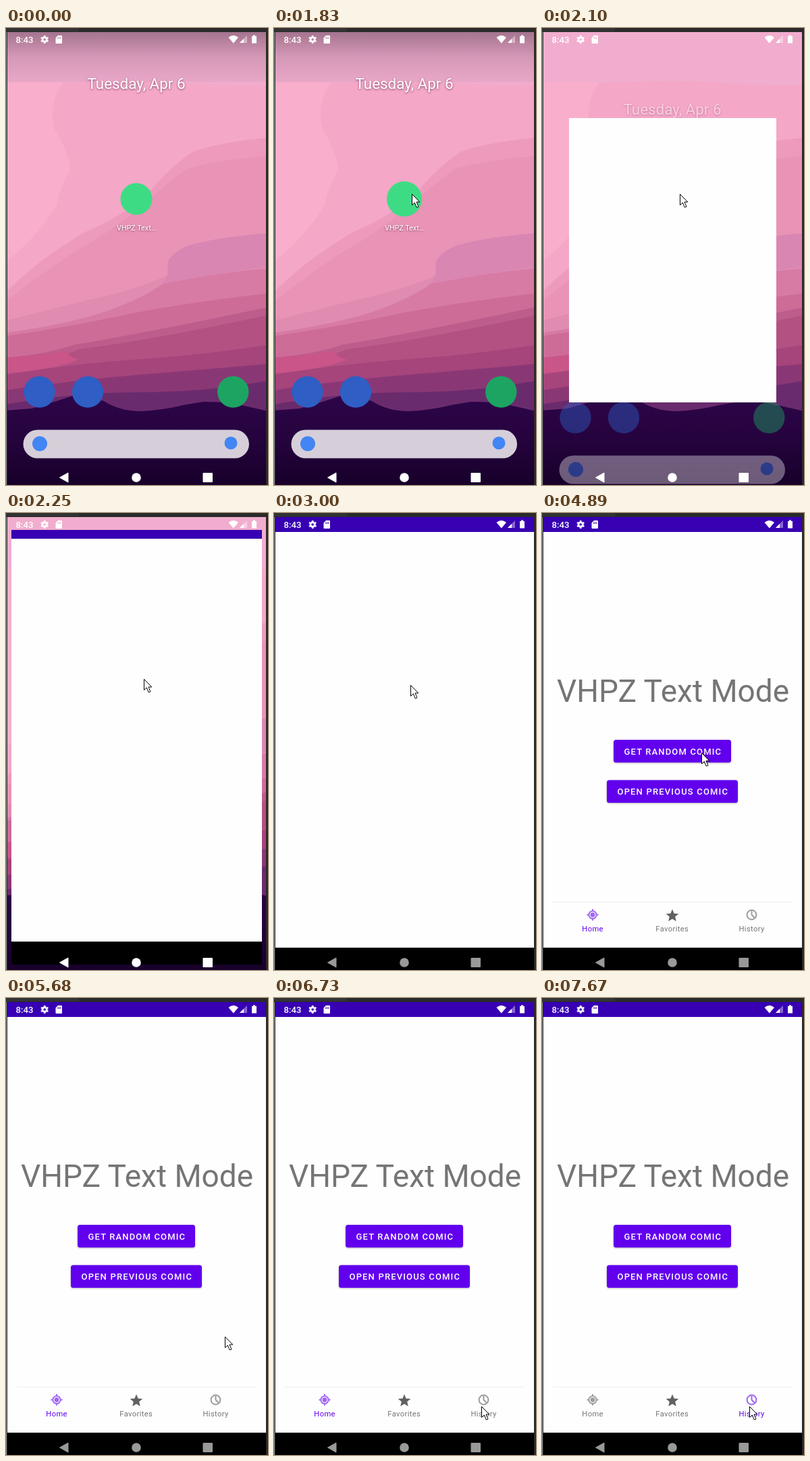
Write an HTML page that moves like this. It is 388x675 px and loops after 8000 ms.

```html
<!DOCTYPE html>
<html lang="en">
<head>
<meta charset="utf-8">
<title>App launch</title>
<style>
  html, body { margin: 0; height: 100%; overflow: hidden; background: #2b2a2b; }
  svg { display: block; width: 100vw; height: 100vh; font-family: Roboto, sans-serif; }
  .glow { filter: drop-shadow(0 1px 1.5px rgba(60, 10, 50, .6)); }
  .button { font-weight: 500; font-size: 13px; letter-spacing: 1.16px; fill: #fff; }
  .tab { color: #757575; font-size: 11.2px; letter-spacing: .37px; }
  .tab text { fill: currentColor; }
  .tab .icon { color: #9e9e9e; }
  .tab.on { color: #6200ee; }
  .tab.on .icon { color: #a066f3; }
</style>
</head>
<body>
<svg viewBox="0 0 388 675" preserveAspectRatio="none">
  <defs>
    <linearGradient id="scrimFill" x2="0" y2="1">
      <stop offset="0" stop-color="#2a1828" stop-opacity=".38"/>
      <stop offset=".5" stop-color="#2a1828" stop-opacity=".14"/>
      <stop offset="1" stop-color="#2a1828" stop-opacity=".04"/>
    </linearGradient>
    <linearGradient id="hillFill" x2="0" y2="1">
      <stop offset="0" stop-color="#2d0549"/>
      <stop offset=".5" stop-color="#25033d"/>
      <stop offset="1" stop-color="#17002a"/>
    </linearGradient>
    <clipPath id="tabClip"><rect x="247" y="575" width="123" height="52"/></clipPath>
    <clipPath id="screen"><rect x="2" y="6" width="383" height="669"/></clipPath>
  </defs>

  <rect width="388" height="675" fill="#2b2a2b"/>
  <rect width="108" height="5" fill="#343334"/>
  <rect y="6" width="1" height="669" fill="#8a8a8a"/>

  <g clip-path="url(#screen)">
    <g id="wallpaper">
      <rect width="388" height="675" fill="#f4a7c7"/>
      <path fill="#f1adce" d="M0 0H388V84Q330 86 270 81T110 80T0 78Z"/>
      <path fill="#f9aecb" d="M0 80H84Q62 115 72 150Q92 180 95 210Q80 235 75 262Q50 305 0 345Z"/>
      <path fill="#ed9abc" d="M388 162Q320 168 276 183Q236 212 216 238Q180 275 120 300Q50 340 0 390V675H388Z"/>
      <path fill="#e993b6" d="M388 189Q320 194 268 208Q235 232 205 260Q150 305 95 335Q40 372 0 404V675H388Z"/>
      <path fill="#e08bb0" d="M0 432Q70 415 120 402Q190 388 240 365L388 320V675H0Z"/>
      <path fill="#da86b3" d="M388 303Q310 309 268 322Q240 335 239 350Q242 366 232 378Q290 366 388 352Z"/>
      <path fill="#d77ba4" d="M0 450Q90 438 150 418Q205 398 232 378Q310 362 388 355V675H0Z"/>
      <path fill="#cd6c97" d="M0 455Q90 442 170 425T388 392V675H0Z"/>
      <path fill="#bd5d8b" d="M0 487Q60 482 100 468Q200 452 388 412V675H0Z"/>
      <path fill="#b25182" d="M0 500Q70 490 110 474Q210 462 388 424V675H0Z"/>
      <path fill="#c95589" d="M0 487Q55 482 92 477Q88 484 108 490Q70 505 0 510Z"/>
      <path fill="#a6447c" d="M0 512Q100 496 200 489T388 468V675H0Z"/>
      <path fill="#8a3875" d="M0 535Q100 520 200 512T388 496V675H0Z"/>
      <path fill="#6a2b6d" d="M0 556Q100 538 200 538T388 521V675H0Z"/>
      <path fill="url(#hillFill)" d="M0 565L38 562L72 552L100 543L122 546L145 551Q168 566 200 566Q235 564 262 557L292 552L330 553L362 560L388 566V675H0Z"/>
    </g>
    <rect id="scrim" y="6" width="388" height="74" fill="url(#scrimFill)"/>

    <g id="home">
      <text class="glow" x="193" y="90" font-size="22.400" fill="#fff" text-anchor="middle">Tuesday, Apr 6</text>
      <circle id="app" cx="193" cy="252.500" r="23.500" fill="#3ddc84"/>
      <text class="glow" x="193" y="298.500" font-size="10.800" fill="#fff" text-anchor="middle">VHPZ Text…</text>
      <circle cx="49.500" cy="537.500" r="23.200" fill="#2f5ec4"/>
      <circle cx="121" cy="537.500" r="23.200" fill="#2f5ec4"/>
      <circle cx="336.300" cy="537.500" r="23.200" fill="#1da462"/>
      <rect x="25.500" y="593.500" width="334.500" height="42" rx="21" fill="#d6cfd9"/>
      <circle cx="50" cy="614" r="11" fill="#4285f4"/>
      <circle cx="333" cy="613" r="9.500" fill="#4285f4"/>
    </g>

    <g id="window">
      <rect id="paper" fill="#fefefe"/>
      <rect id="barTop" fill="#3700b3"/>
      <rect id="barBottom" fill="#000"/>
    </g>

    <g id="page">
      <text x="194" y="278.500" font-size="46" fill="#757575" text-anchor="middle">VHPZ Text Mode</text>
      <g fill="#6200ee" style="filter:drop-shadow(0 1px 1px rgba(0,0,0,.3))">
        <rect x="106" y="335" width="174" height="33.500" rx="3.500"/>
        <rect x="96" y="394.500" width="194" height="33.500" rx="3.500"/>
      </g>
      <text class="button" x="121.500" y="356.700">GET RANDOM COMIC</text>
      <text class="button" x="111.500" y="416.400">OPEN PREVIOUS COMIC</text>
      <path d="M16 574.500H370" stroke="#eee"/>
      <g clip-path="url(#tabClip)"><circle id="ripple" cx="310" cy="601" fill="#6200ee" fill-opacity=".12"/></g>
      <g id="tabHome" class="tab">
        <g class="icon" transform="translate(75 593.500)" fill="none" stroke="currentColor" stroke-width="1.900">
          <circle r="5.600"/>
          <circle r="3.400" fill="currentColor" stroke="none"/>
          <path d="M0-8.500V-5M0 8.500V5M-8.500 0H-5M8.500 0H5"/>
        </g>
        <text x="59.300" y="618">Home</text>
      </g>
      <g class="tab">
        <path id="star" fill="#616161"/>
        <text x="168.300" y="618">Favorites</text>
      </g>
      <g id="tabHistory" class="tab">
        <g class="icon" transform="translate(310.500 593.500)" fill="none" stroke="currentColor" stroke-width="2">
          <circle r="6.900"/>
          <path d="M0-6V0L4.500 4.500"/>
        </g>
        <text x="291.500" y="618">History</text>
      </g>
    </g>

    <g fill="#fff">
      <text x="14.500" y="22" font-size="13.200" font-weight="500">8:43</text>
      <g transform="translate(57.200 17)" fill="none" stroke="#fff">
        <circle r="3.200" stroke-width="2.800"/>
        <path d="M0-6V-4M0 6V4M-5.200-3L-3.500-2M5.200 3L3.500 2M-5.200 3L-3.500 2M5.200-3L3.500-2" stroke-width="2.600"/>
      </g>
      <path fill-rule="evenodd" d="M77 11H82Q83 11 83 12V22Q83 23 82 23H74.500Q73.500 23 73.500 22V14.500ZM76.200 13.500V16H77.200V13.500ZM78.200 13.500V16H79.200V13.500ZM80.200 13.500V16H81.200V13.500Z"/>
      <path d="M329.500 14Q336.800 8 344 14L336.800 22.500Z"/>
      <path d="M357 11V22H346Z" fill-opacity=".4"/>
      <path d="M352 16V22H346Z"/>
      <path d="M366 10.500H369V12H371V22.500H364V12H366Z"/>
    </g>
    <g id="keys">
      <path d="M79.500 664L92 657V671Z" stroke="currentColor" stroke-width="1" stroke-linejoin="round"/>
      <circle cx="193" cy="664" r="6.800"/>
      <rect x="291.500" y="657" width="14.500" height="14" rx="1"/>
    </g>
  </g>

  <path id="cursor" d="M.5.5V16.500L4.300 13L7.300 20L10 18.800L7 12H11.800Z" fill="#fff" stroke="#000"/>
</svg>
<script>
const LOOP = 8000;
const $ = id => document.getElementById(id);
const show = (id, on) => { $(id).style.display = on ? "" : "none"; };
const set = (id, attrs) => { for (const k in attrs) $(id).setAttribute(k, attrs[k]); };
const box = (id, x, y, right, bottom) =>
  set(id, { x, y, width: right - x, height: Math.max(0, bottom - y) });

// Latest row whose time has come; rows start with a time in ms.
const at = (rows, t) => rows.filter(r => r[0] <= t).pop();

// Cursor path between two points in equal held steps.
function glide(t0, t1, steps, [x0, y0], [x1, y1]) {
  return Array.from({ length: steps }, (_, i) => {
    const u = (i + 1) / steps, e = u * u * (3 - 2 * u);
    return [t0 + (t1 - t0) * i / (steps - 1), x0 + (x1 - x0) * e, y0 + (y1 - y0) * e];
  });
}

const pointer = [
  [400, 291, 361], [540, 243, 361], [690, 188, 352], [830, 146, 318],
  [960, 150, 285], [1110, 172, 252], [1260, 192, 236], [1410, 204, 245],
  ...glide(2910, 3780, 7, [204, 245], [163, 406]),
  ...glide(3910, 4180, 3, [163, 406], [236, 354]),
  ...glide(5040, 5680, 5, [236, 354], [324, 500]),
  [5800, 324, 520],
  ...glide(5950, 6480, 5, [324, 520], [301, 603]),
  [6610, 304, 603], [6730, 307, 603]
];

// time, left, top, right, bottom, end of status bar, start of key bar
const opening = [
  [2100, 40, 133, 347, 553, 133, 553],
  [2250, 8, 25, 379, 667, 38, 633],
  [2370, 4, 12, 383, 674, 31, 640],
  [2490, 2, 6, 385, 675, 28, 642]
];
const pressed = [[0, 23.5], [1680, 25], [1830, 26]];
const ripples = [[0, 0], [7130, 24], [7270, 44], [7400, 62], [7670, 0]];

const starPoints = Array.from({ length: 10 }, (_, i) => {
  const a = i * Math.PI / 5, r = i % 2 ? 4.4 : 9.8;
  return `${193 + r * Math.sin(a)} ${595 - r * Math.cos(a)}`;
});
set("star", { d: `M${starPoints.join("L")}Z` });

function draw(t) {
  const launched = t >= 2100;
  show("scrim", !launched);
  show("home", t < 2250);
  set("home", { transform: `translate(0 ${launched ? 38 : 0})`, opacity: launched ? .45 : 1 });
  set("app", { r: at(pressed, t)[1] });

  show("window", launched);
  if (launched) {
    const [, x, y, right, bottom, head, foot] = at(opening, t);
    box("paper", x, y, right, bottom);
    box("barTop", x, y, right, head);
    box("barBottom", x, foot, right, bottom);
  }

  show("page", t >= 4890);
  const history = t >= 7670;
  $("tabHome").classList.toggle("on", !history);
  $("tabHistory").classList.toggle("on", history);
  set("ripple", { r: at(ripples, t)[1] });

  const keys = t < 2760 ? "#fff" : "#999";
  set("keys", { fill: keys, color: keys });

  const p = at(pointer, t);
  show("cursor", p);
  if (p) set("cursor", { transform: `translate(${Math.round(p[1])} ${Math.round(p[2])})` });
}

const start = performance.now();
function tick() {
  draw((performance.now() - start) % LOOP);
  requestAnimationFrame(tick);
}
tick();
</script>
</body>
</html>
```
